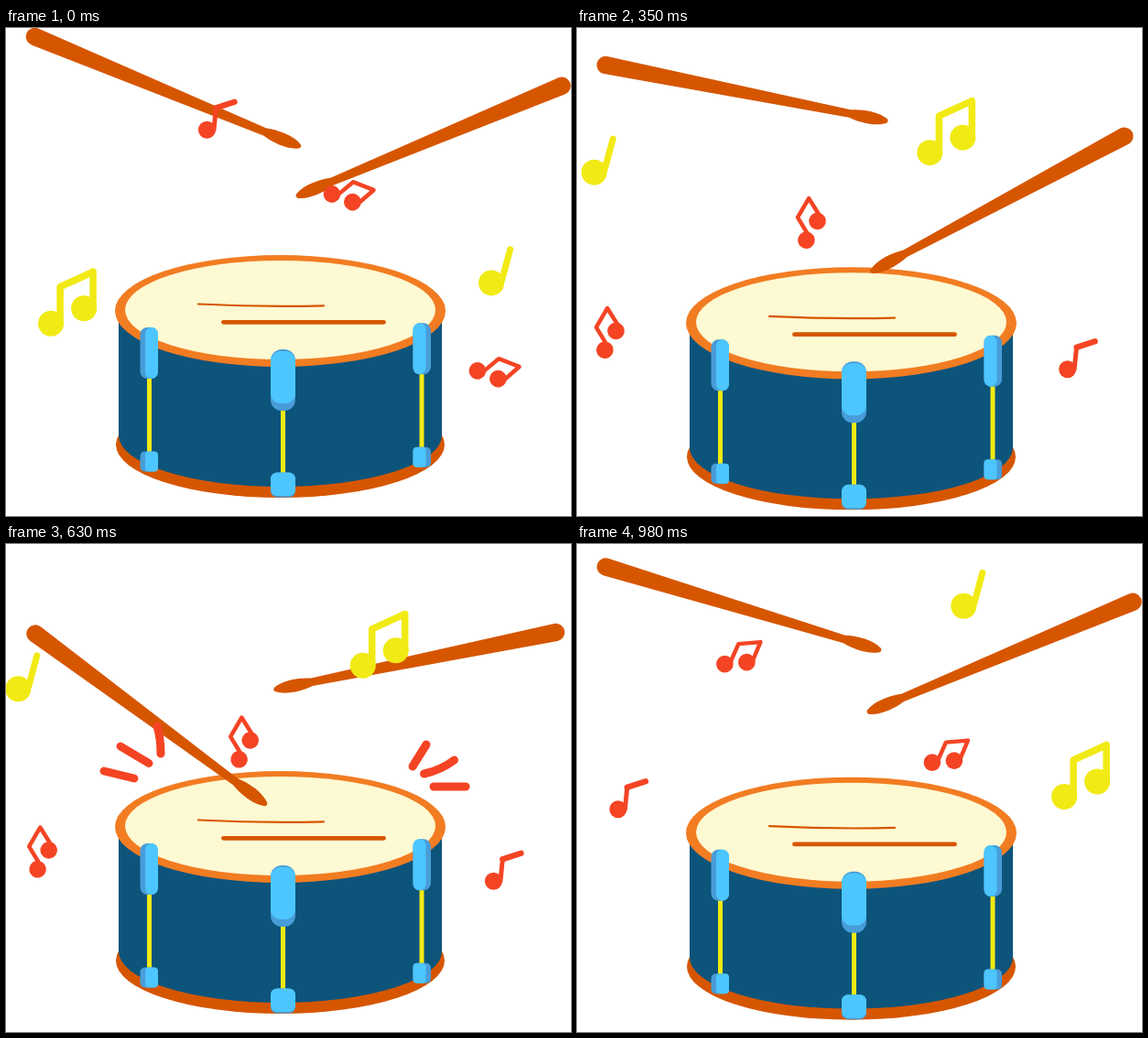
Recreate the animation shown at these times as an HTML page with a canvas. Size 617 px wide and 533 px high, loop 1.05 s.

```html
<!DOCTYPE html>
<html lang="en">
<head>
<meta charset="utf-8">
<title>Drum</title>
<style>
  html, body { margin: 0; width: 100%; height: 100%; overflow: hidden; background: #fff; }
  canvas { display: block; width: 617px; height: 533px; }
</style>
</head>
<body>
<canvas id="stage" width="617" height="533"></canvas>
<script>
const ctx = document.getElementById('stage').getContext('2d');
const FRAME = 70, COUNT = 15, SCENE = 5;
const WOOD = '#d65600', RIM = '#f27c22', SKIN = '#fdf9d2', NAVY = '#0d547b';
const LIGHT = '#4dc6ff', SHADE = '#489cd8', YELLOW = '#f1ea14', RED = '#f44424';
const rad = degrees => degrees * Math.PI / 180;

// Piecewise linear value along evenly spaced points, k in 0..1
function along(k, points) {
  const s = k * (points.length - 1);
  const i = Math.min(Math.floor(s), points.length - 2);
  return points[i].map((v, j) => v + (points[i + 1][j] - v) * (s - i));
}

function ellipse(x, y, rx, ry, color) {
  ctx.fillStyle = color;
  ctx.beginPath();
  ctx.ellipse(x, y, rx, ry, 0, 0, 2 * Math.PI);
  ctx.fill();
}

function box(x, y, w, h, r, color) {
  ctx.fillStyle = color;
  ctx.beginPath();
  ctx.roundRect(x, y, w, h, r);
  ctx.fill();
}

function stroke(d, width, color) {
  ctx.strokeStyle = color;
  ctx.lineWidth = width;
  ctx.stroke(new Path2D(d));
}

function at(x, y, draw, degrees = 0, flip = 1) {
  ctx.save();
  ctx.translate(x, y);
  ctx.rotate(rad(degrees));
  ctx.scale(flip, 1);
  draw();
  ctx.restore();
}

function sideRod() {
  stroke('M10 50V140', 5, YELLOW);
  for (const [y, h, r] of [[0, 56, 8], [135.5, 22, 5]]) {
    box(0, y, 19.5, h, r, SHADE);
    box(5.5, y, 14, h, r - 1, LIGHT);
  }
}

function frontRod() {
  stroke('M13.5 60V140', 5, YELLOW);
  box(0, 0, 27, 67, 12, SHADE);
  box(0, 2, 27, 57, 11, LIGHT);
  box(0, 134.5, 27, 27, 7, SHADE);
  box(0, 134.5, 27, 25.5, 7, LIGHT);
}

function drum() {
  ellipse(299.5, 455, 179.5, 58, WOOD);
  ctx.fillStyle = NAVY;
  ctx.fill(new Path2D('M123 309V445A176.5 56 0 0 0 476 445V309Z'));
  ellipse(299.5, 309, 180.5, 61, RIM);
  ellipse(299.5, 308, 169.5, 54, SKIN);
  stroke('M210 301.5Q280 305 347 303.3', 2.2, WOOD);
  stroke('M237.5 321.3H412.5', 4.8, WOOD);
  at(146.5, 327, sideRod);
  at(464, 322.3, sideRod, 0, -1);
  at(289, 351, frontRod);
}

function stick([x, y, angle], side) {
  at(x, y, () => {
    ctx.fillStyle = WOOD;
    ctx.fill(new Path2D('M0 -9.7A9.7 9.7 0 0 0 0 9.7L272 4.3C284 7.5 302 8.5 313 2.5' +
      'Q316 0 313 -2.5C302 -8.5 284 -7.5 272 -4.3Z'));
  }, side * angle, side);
}

function yellowPair() {
  ellipse(0, 0, 14, 14, YELLOW);
  ellipse(36, -16.5, 14, 14, YELLOW);
  stroke('M10 0V-40L46 -56.5V-16', 7.5, YELLOW);
}

function yellowSingle() {
  ellipse(0, 0, 14, 14, YELLOW);
  stroke('M11.5 -3L20.5 -36.5', 7, YELLOW);
}

function redSingle() {
  ellipse(0, 0, 9.5, 9.5, RED);
  stroke('M7.5 0L10 -24.5', 5, RED);
  stroke('M10 -24L30 -30.5', 6.5, RED);
}

function redPair() {
  ellipse(0, 0, 9.3, 9.3, RED);
  ellipse(24, -2, 9.3, 9.3, RED);
  stroke('M7 -4L15 -22L39 -24L31 -5', 4.5, RED);
}

// One place per scene; the drift direction starts at heading and turns by spin each scene
const notes = [
  { draw: redSingle, heading: -56, spin: -70, places: [[221, 109], [534, 370.5], [47.5, 289]] },
  { draw: redPair, heading: 110, spin: -70, places: [[355, 184], [252.5, 233.5], [159, 132.5]] },
  { draw: redPair, heading: 110, spin: -70, places: [[514, 377], [32.5, 353.5], [385.5, 240]] },
  { draw: yellowPair, heading: -140, spin: 103, places: [[47, 321], [387.5, 134.5], [531, 273.5]] },
  { draw: yellowSingle, heading: 70, spin: 103, places: [[531, 281], [16, 158], [422, 70.5]] }
];
const pairTilts = [26, -55, 0];

// Stick poses from struck to raised: handle x, y and angle
const leftPoses = [[32, 98, 36.5], [31, 56, 5.6], [31.5, 9.5, 22.5]];
const rightPoses = [[596.5, 129, 36.5], [600.5, 96.5, 11.5], [607, 63.3, 22.6]];

function render(f) {
  ctx.clearRect(0, 0, 617, 533);
  ctx.lineCap = ctx.lineJoin = 'round';

  // Two bounces, after a short rest
  const drop = f < 3 ? 0 : 20 * (1 - Math.abs((f - 3) % 6 - 3) / 3);
  at(0, drop, drum);

  const lift = hit => Math.min(1, Math.abs(f - hit) / 6);
  stick(along(lift(9), leftPoses), 1);
  stick(along(lift(6), rightPoses), -1);

  const scene = Math.floor(f / SCENE);
  const drift = 5.5 * (f % SCENE / (SCENE - 1) - 0.5);
  for (const { draw, heading, spin, places } of notes) {
    const [x, y] = places[scene], a = rad(heading + spin * scene);
    at(x + drift * Math.cos(a), y + drift * Math.sin(a), draw,
      draw === redPair ? pairTilts[scene] : 0);
  }

  if (f >= 6 && f <= 10) {
    stroke('M107 248L140 256M125 221L156 239.5M165 199Q169 212 169 229' +
      'M459 219L444 243M456.5 251Q475 247 489.5 236M467 265H502', 9, RED);
  }
}

function tick() {
  render(Math.floor(performance.now() / FRAME) % COUNT);
  requestAnimationFrame(tick);
}
tick();
</script>
</body>
</html>
```
